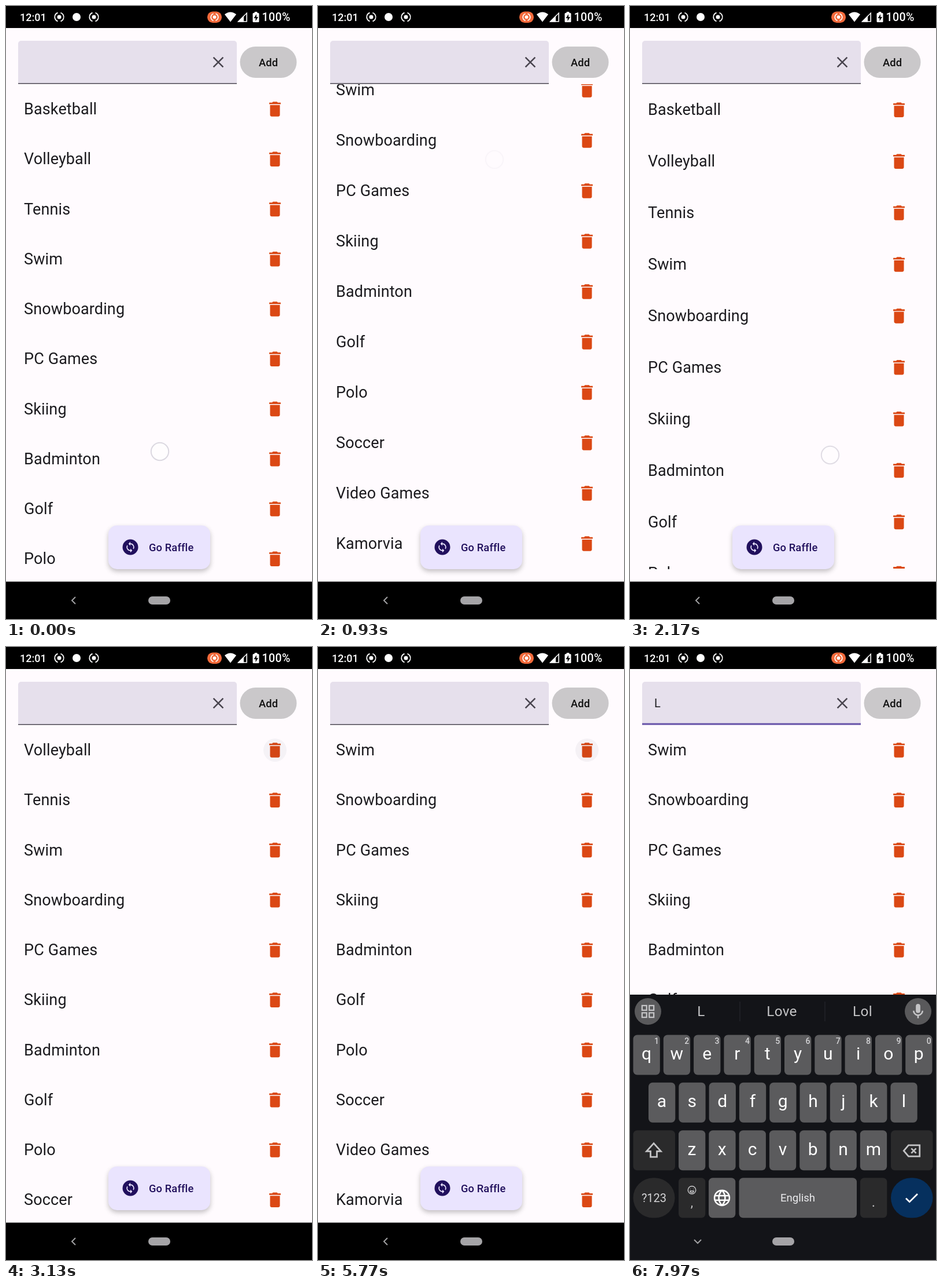
Write an HTML page with a canvas that moves like this. It is 529 px wide and 1058 px high and loops after 8 s.

```html
<!DOCTYPE html>
<html lang="en">
<head>
<meta charset="utf-8">
<title>Raffle list</title>
<style>
html, body { margin: 0; width: 100%; height: 100%; overflow: hidden; background: #000; }
canvas { display: block; }
</style>
</head>
<body>
<canvas id="stage" width="529" height="1058"></canvas>
<script>
const ctx = document.getElementById('stage').getContext('2d');
const LOOP = 8000, ROW = 86.25, FIRST_ROW = 178, MAX_SCROLL = 284.5;
const LIST_TOP = 135, LIST_BOTTOM = 972, NAV_TOP = 993.5;
const ITEMS = ['Basketball', 'Volleyball', 'Tennis', 'Swim', 'Snowboarding', 'PC Games', 'Skiing',
  'Badminton', 'Golf', 'Polo', 'Soccer', 'Video Games', 'Kamorvia'];
const DELETE_TAPS = [2860, 4190, 5510];
const FIELD_TAP = 6500, FOCUS = 6580, KEYBOARD_START = 6650, KEYBOARD_TIME = 344, KEY_TAP = 7310, TYPED = 7400;
const KEY = '#5b5b5d', DARK_KEY = '#2a2a2b', LIGHT = '#c4c4c6';

const ICONS = {
  trash: 'M6 19c0 1.1.9 2 2 2h8c1.1 0 2-.9 2-2V7H6zM19 4h-3.5l-1-1h-5l-1 1H5v2h14z',
  sync: 'M12 4V1L8 5l4 4V6a6 6 0 0 1 5.3 8.8l1.46 1.46A8 8 0 0 0 12 4zm0 14a6 6 0 0 1-5.3-8.8L5.24 7.74A8 8 0 0 0 12 20v3l4-4-4-4z',
  mic: 'M12 14a3 3 0 0 0 3-3V5a3 3 0 0 0-6 0v6a3 3 0 0 0 3 3zm5-3a5 5 0 0 1-10 0H5a7 7 0 0 0 6 6.92V21h2v-3.08A7 7 0 0 0 19 11z',
  palette: 'M12 3a9 9 0 0 0 0 18c1.4 0 1.9-1.5 1.1-2.5-.9-1 0-2.5 1.2-2.5H16a5 5 0 0 0 5-5c0-4.4-4-8-9-8z',
  close: 'M5.5 5.5l13 13M18.5 5.5l-13 13',
  shift: 'M12 3L3 13h5v7h8v-7h5z',
  erase: 'M8 5h14v14H8L2 12zM11.5 9l6 6M17.5 9l-6 6',
  globe: 'M12 2a10 10 0 0 0 0 20a10 10 0 0 0 0-20a14 14 0 0 0 0 20a14 14 0 0 0 0-20M3 9h18M3 15h18',
  smile: 'M12 3a9 9 0 0 0 0 18a9 9 0 0 0 0-18M8 14a4 4 0 0 0 8 0zM8.5 9v1M15.5 9v1',
  check: 'M4 12.5l5 5L20 6.5',
  grid: 'M3 3h7v7H3zM14 3h7v7h-7zM3 14h7v7H3zM14 14h7v7h-7z',
  clipboard: 'M4 4h16v17H4zM9 2h6v4H9zM8 10h8M8 13.5h8M8 17h5',
  sticker: 'M3 3h18v12l-6 6H3zM21 15h-6v6M8 12a4 4 0 0 0 7 0M9 8v1M15 8v1',
  chevron: 'M15 6l-6 6 6 6'
};
for (const name in ICONS) ICONS[name] = new Path2D(ICONS[name]);

const clamp = (v, lo = 0, hi = 1) => Math.min(hi, Math.max(lo, v));
const ramp = (t, from, to) => clamp((t - from) / (to - from));
const smooth = p => p * p * (3 - 2 * p);
const mix = (a, b, p) => a + (b - a) * p;

function box(x, y, w, h, r, fill) {
  ctx.fillStyle = fill;
  ctx.beginPath();
  ctx.roundRect(x, y, w, h, r);
  ctx.fill();
}

function circle(x, y, r, fill, stroke, width = 2) {
  ctx.beginPath();
  ctx.arc(x, y, r, 0, 7);
  if (fill) { ctx.fillStyle = fill; ctx.fill(); }
  if (stroke) { ctx.strokeStyle = stroke; ctx.lineWidth = width; ctx.stroke(); }
}

function text(str, x, y, size, color, { weight = 400, align = 'left', spacing = 0 } = {}) {
  ctx.font = `${weight} ${size}px Roboto, sans-serif`;
  ctx.textAlign = align;
  ctx.letterSpacing = spacing + 'px';
  ctx.fillStyle = color;
  ctx.fillText(str, x, y);
}

// Icons use a 24-unit box; a line width draws an outline instead of a fill.
function icon(name, x, y, size, color, line = 0, angle = 0) {
  ctx.save();
  ctx.translate(x, y);
  ctx.rotate(angle);
  ctx.scale(size / 24, size / 24);
  ctx.translate(-12, -12);
  ctx.fillStyle = ctx.strokeStyle = color;
  ctx.lineWidth = line;
  if (line) ctx.stroke(ICONS[name]); else ctx.fill(ICONS[name]);
  ctx.restore();
}

function shape(path, fill) {
  ctx.fillStyle = fill;
  ctx.fill(new Path2D(path));
}

function recordIcon(x, y, size) {
  circle(x, y, size * .45, '#fff');
  ctx.lineWidth = 1.7;
  ctx.strokeStyle = '#fff';
  for (const side of [0, Math.PI]) {
    ctx.beginPath();
    ctx.arc(x, y, size, side - 1.25, side + 1.25);
    ctx.stroke();
  }
}

function statusBar() {
  box(0, 0, 529, 38, 0, '#000');
  text('12:01', 24, 25.5, 18, '#fff', { weight: 500 });
  recordIcon(92, 19, 7.8);
  circle(122, 19, 7, '#fff');
  recordIcon(152, 19, 7.8);
  box(348, 9.5, 25, 19.5, 9.5, '#f26a3b');
  recordIcon(360.5, 19.2, 6.3);
  shape('M378 14.5Q388 6.5 398 14.5L388 27.5z', '#fff');
  shape('M400 27.5L417 10.5V27.5zM411 18.5V26H415.4V14z', '#fff');
  shape('M400 27.5L411 16.5V27.5z', '#fff');
  box(429.5, 10, 5, 4, 1, '#fff');
  box(426.5, 12, 11, 16, 1.5, '#fff');
  shape('M433 14l-4.5 7h3v5l4.5-7h-3z', '#000');
  text('100%', 442.5, 26, 19.5, '#fff', { weight: 500, spacing: .4 });
}

function gestures(t) {
  const up = smooth(ramp(t, 60, 760)), down = smooth(ramp(t, 1150, 2110));
  const y1 = mix(769, 265, up), y2 = mix(275, 775, down);
  const pulled = Math.max(0, 769 - y1 - 14);
  const returned = Math.max(0, y2 - 293.8);
  return {
    scroll: clamp(Math.min(pulled, MAX_SCROLL) - returned, 0, MAX_SCROLL),
    stretchEnd: Math.max(0, pulled - MAX_SCROLL) * 2e-4 * Math.exp(-Math.max(0, t - 800) / 85),
    stretchStart: Math.max(0, returned - MAX_SCROLL) * 2e-4 * Math.exp(-Math.max(0, t - 2150) / 85),
    touches: [
      [mix(266, 305, up), y1, -100, 800],
      [mix(300, 346, down), y2, 1110, 2150],
      ...DELETE_TAPS.map(tap => [465, 178, tap, tap + 100]),
      [200, 97, FIELD_TAP, FIELD_TAP + 80],
      [474, 787, KEY_TAP, TYPED]
    ]
  };
}

function list(t, { scroll, stretchStart, stretchEnd }) {
  const removed = DELETE_TAPS.filter(tap => t >= tap + 140).length;
  const place = y => stretchEnd > 1e-4
    ? LIST_BOTTOM - (LIST_BOTTOM - y) * (1 + stretchEnd)
    : LIST_TOP + (y - LIST_TOP) * (1 + stretchStart);
  ctx.save();
  ctx.beginPath();
  ctx.rect(0, LIST_TOP, 529, LIST_BOTTOM - LIST_TOP);
  ctx.clip();
  ITEMS.slice(removed).forEach((name, i) => {
    const y = place(FIRST_ROW + i * ROW - scroll);
    text(name, 31, y + 9, 27, '#1c1b1f', { spacing: .13 });
    icon('trash', 465, y, 34, '#db4814');
  });
  for (const tap of DELETE_TAPS) {
    const age = t - tap;
    if (age < 0 || age > 350) continue;
    circle(465, 178, mix(8, 20, ramp(age, 0, 110)), `rgba(40,50,70,${.12 * (1 - ramp(age, 120, 350))})`);
  }
  ctx.restore();
}

function raffleButton() {
  ctx.save();
  ctx.shadowColor = 'rgba(0,0,0,.24)';
  ctx.shadowBlur = 8;
  ctx.shadowOffsetY = 4;
  box(177, 896.5, 176, 75.5, 15, '#eae4fe');
  ctx.restore();
  circle(215, 934, 13.5, '#21105d');
  icon('sync', 215, 934, 20, '#eae4fe');
  text('Go Raffle', 247, 941, 18.3, '#21105d', { weight: 500, spacing: .13 });
}

function inputRow(t) {
  const focused = t >= FOCUS, typed = t >= TYPED;
  box(21, 60, 378, 74, [5, 5, 0, 0], '#e6e0ec');
  if (focused) box(21, 131.5, 378, 3, 0, '#6552a8');
  else box(21, 133, 378, 1.5, 0, '#4b4752');
  if (typed) text('L', 42, 104, 20, '#1c1b1f');
  const blink = Math.floor((t - (typed ? TYPED : FOCUS)) / 500) % 2 === 0;
  if (focused && blink) box(typed ? 54 : 42.5, 86, 2.5, 23, 0, '#6b58ab');
  icon('close', 367, 97, 31, '#49454f', 2);
  box(404.5, 70, 98, 54, 27, '#cac8ca');
  text('Add', 453.5, 103.5, 18.3, '#111', { weight: 500, align: 'center', spacing: .13 });
}

function gear(x, y) {
  circle(x, y, 6.2, null, LIGHT, 4.8);
  ctx.lineWidth = 5;
  for (let i = 0; i < 6; i++) {
    const a = i * Math.PI / 3 + Math.PI / 6, c = Math.cos(a), s = Math.sin(a);
    ctx.beginPath();
    ctx.moveTo(x + 6 * c, y + 6 * s);
    ctx.lineTo(x + 11.5 * c, y + 11.5 * s);
    ctx.stroke();
  }
}

function toolbar(typed) {
  circle(31, 629, 23, '#59595b');
  icon('grid', 31, 629, 27, LIGHT, 2);
  circle(498, 629, 23, '#59595b');
  icon('mic', 498, 629, 31, LIGHT);
  if (typed) {
    ['L', 'Love', 'Lol'].forEach((word, i) =>
      text(word, 123 + i * 139.5, 637, 24.3, LIGHT, { align: 'center', spacing: .3 }));
    for (const x of [189.5, 336.5]) box(x, 612, 1, 34, 0, '#2b2b30');
    return;
  }
  icon('sticker', 109, 629, 29, '#49494b', 2);
  text('GIF', 187, 635.5, 18, '#49494b', { weight: 900, align: 'center', spacing: 1 });
  icon('clipboard', 264, 629, 27, LIGHT, 2.2);
  icon('palette', 342, 629, 30, LIGHT);
  for (const [x, y] of [[-7, 0], [-3.5, -5], [3.5, -5], [7, 0]]) circle(342 + x, 629 + y, 1.9, '#141518');
  gear(419, 629);
}

function letterRow(letters, x, y, typed) {
  [...letters].forEach((letter, i) => {
    const left = x + i * 52.3;
    box(left, y, 46.3, 69, 7, KEY);
    text(typed ? letter.toLowerCase() : letter, left + 23, y + (typed ? 42.5 : 45), 30, '#fff', { align: 'center' });
    if (letters.length === 10)
      text((i + 1) % 10, left + 40.5, y + 15, 14, '#d4d4d6', { weight: 500, align: 'center' });
  });
}

function keyboard(t) {
  const typed = t >= TYPED;
  const rest = 1 - ramp(t, KEYBOARD_START, KEYBOARD_START + KEYBOARD_TIME);
  ctx.save();
  ctx.translate(0, 458 * rest ** 3);
  box(0, 600, 529, 460, 0, '#131418');
  toolbar(typed);
  letterRow('QWERTYUIOP', 5.5, 669.5, typed);
  letterRow('ASDFGHJKL', 32, 751.8, typed);
  letterRow('ZXCVBNM', 84, 834.2, typed);
  box(5.5, 834.2, 72.5, 69, 7, DARK_KEY);
  icon('shift', 41, 869, 33, LIGHT, typed ? 2 : 0);
  box(451, 834.2, 72.5, 69, 7, DARK_KEY);
  icon('erase', 487, 869.5, 33, LIGHT, 2);

  const y = 916.3;
  box(5.5, y, 72, 69, 34.5, DARK_KEY);
  text('?123', 41.5, y + 41.5, 20, '#d4d4d6', { align: 'center' });
  box(84, y, 46.3, 69, 7, DARK_KEY);
  icon('smile', 107, y + 21, 18, LIGHT, 2);
  text(',', 107, y + 50, 22, LIGHT, { align: 'center' });
  box(136, y, 46.3, 69, 7, KEY);
  icon('globe', 159, y + 34.5, 31, '#fff', 2);
  box(188.5, y, 203.5, 69, 7, KEY);
  text('English', 290, y + 41, 18.5, '#ececee', { align: 'center' });
  box(398, y, 46.3, 69, 7, DARK_KEY);
  text('.', 421, y + 50, 24, LIGHT, { align: 'center' });
  box(451, y, 72.5, 69, 34.5, '#06305e');
  icon('check', 487, y + 34.5, 30, '#fff', 2.2);
  ctx.restore();
}

function navigation(t) {
  const turn = ramp(t, KEYBOARD_START, KEYBOARD_START + KEYBOARD_TIME);
  icon('chevron', 117, 1026, 24, '#a0a0a2', 2, -turn * Math.PI / 2);
  box(246, 1019, 38, 14, 7, '#a5a4a7');
}

function touchRings(t, touches) {
  for (const [x, y, from, to] of touches) {
    if (t < from || t > to + 160) continue;
    ctx.globalAlpha = 1 - ramp(t, to, to + 160);
    circle(x, y, 15.2, 'rgba(255,255,255,.45)', 'rgba(200,197,210,.65)', 2);
  }
  ctx.globalAlpha = 1;
}

function draw() {
  const t = performance.now() % LOOP, motion = gestures(t);
  box(0, 0, 529, 1058, 0, '#fffbfe');
  list(t, motion);
  raffleButton();
  inputRow(t);
  statusBar();
  box(0, NAV_TOP, 529, 65, 0, '#000');
  if (t >= KEYBOARD_START) keyboard(t);
  navigation(t);
  touchRings(t, motion.touches);
  requestAnimationFrame(draw);
}
draw();
</script>
</body>
</html>
```
